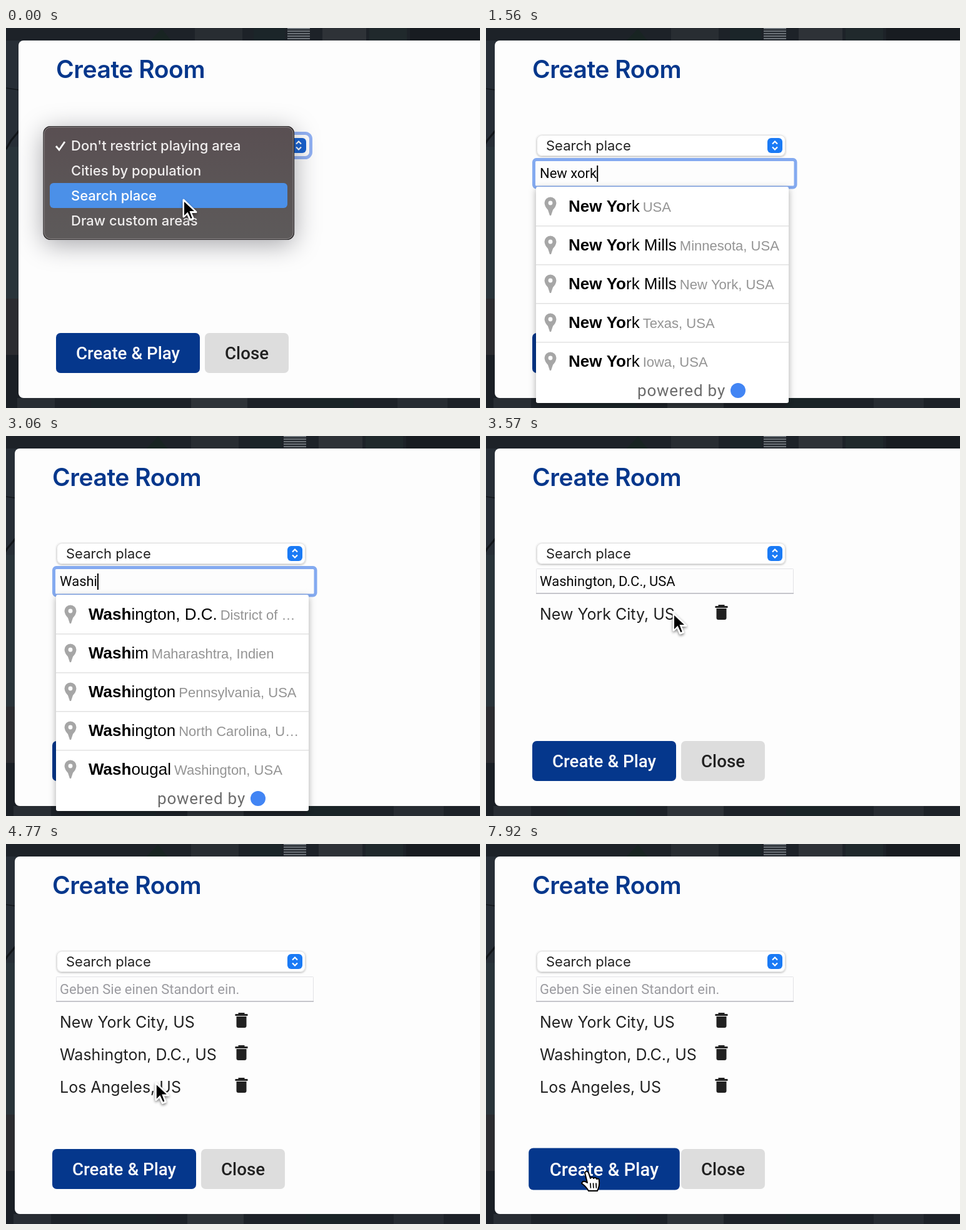
Animation of 758 by 608 pixels, one loop 7.95 s. Source, as an HTML page with a canvas:

```html
<!DOCTYPE html>
<html lang="en">
<head>
<meta charset="utf-8">
<title>Create Room</title>
<style>
  html, body { margin: 0; width: 100%; height: 100%; overflow: hidden; background: #1d2228; }
  canvas { display: block; width: 758px; height: 608px; }
</style>
</head>
<body>
<canvas id="stage" width="758" height="608"></canvas>
<script>
const ctx = document.getElementById('stage').getContext('2d');
const LOOP = 7950;
const MENU_CLOSE = 210;
const KEY_STEP = 105;
const SUGGEST_LAG = 150;
const UI = 'Inter, sans-serif';
const BODY = 'Roboto, sans-serif';
const LIST = '"Liberation Sans", Arial, sans-serif';
const PAPER = '#fdfdfd';
const NAVY = '#05378c';
const INK = '#212121';

const menuItems = ["Don't restrict playing area", 'Cities by population', 'Search place', 'Draw custom areas'];

const searches = [
  {
    focus: 630, start: 800, pick: 2070, clear: 2370, typed: 'New xork', match: 6,
    full: 'New York City, New York, USA', item: 'New York City, US',
    rows: [['New York', 'USA'], ['New York Mills', 'Minnesota, USA'], ['New York Mills', 'New York, USA'],
           ['New York', 'Texas, USA'], ['New York', 'Iowa, USA']]
  },
  {
    focus: 2490, start: 2560, pick: 3450, clear: 3660, typed: 'Washi', match: 4,
    full: 'Washington, D.C., USA', item: 'Washington, D.C., US',
    rows: [['Washington, D.C.', 'District of …'], ['Washim', 'Maharashtra, Indien'],
           ['Washington', 'Pennsylvania, USA'], ['Washington', 'North Carolina, U…'],
           ['Washougal', 'Washington, USA']]
  },
  {
    focus: 3840, start: 4000, pick: 4500, clear: 4710, typed: 'Lo', match: 1,
    full: 'Los Angeles, Kalifornien, USA', item: 'Los Angeles, US',
    rows: [['Las Vegas', 'Nevada, USA'], ['Los Angeles', 'Kalifornien, USA'],
           ['London', 'Vereinigtes Königreich'], ['Lyon', 'Frankreich'],
           ['Lytton', 'Britisch-Kolumbien, Kan…']]
  }
];

// Pointer stops: time, x, y
const path = [
  [0, 284, 275], [240, 284, 275], [570, 292, 230], [1700, 292, 230], [2010, 352, 281],
  [2340, 352, 281], [2470, 320, 230], [3150, 320, 230], [3420, 300, 284], [3640, 300, 284],
  [3820, 270, 230], [4240, 270, 230], [4470, 260, 346], [4710, 260, 346], [4920, 161, 525],
  [LOOP, 161, 525]
];

const clamp = v => Math.max(0, Math.min(1, v));
const smooth = v => v * v * (3 - 2 * v);

function rect(x, y, w, h, color) {
  ctx.fillStyle = color;
  ctx.fillRect(x, y, w, h);
}

function box(x, y, w, h, r, fill, stroke, width = 1) {
  ctx.beginPath();
  ctx.roundRect(x, y, w, h, r);
  if (fill) { ctx.fillStyle = fill; ctx.fill(); }
  if (stroke) { ctx.strokeStyle = stroke; ctx.lineWidth = width; ctx.stroke(); }
}

function poly(points, fill, stroke, width = 1) {
  ctx.beginPath();
  for (const [x, y] of points) ctx.lineTo(x, y);
  if (fill) { ctx.closePath(); ctx.fillStyle = fill; ctx.fill(); }
  if (stroke) { ctx.strokeStyle = stroke; ctx.lineWidth = width; ctx.stroke(); }
}

function disc(x, y, r, color) {
  ctx.beginPath();
  ctx.arc(x, y, r, 0, Math.PI * 2);
  ctx.fillStyle = color;
  ctx.fill();
}

// Draws text and returns its width
function text(str, x, y, font, color, spacing = 0) {
  ctx.font = font;
  ctx.letterSpacing = spacing + 'px';
  ctx.fillStyle = color;
  ctx.fillText(str, x, y);
  return ctx.measureText(str).width;
}

function shadow(color, blur, dy) {
  ctx.shadowColor = color;
  ctx.shadowBlur = blur;
  ctx.shadowOffsetY = dy;
}

function drawBackdrop() {
  rect(-10, 0, 780, 608, '#1d2228');
  rect(-10, 20, 40, 170, '#272e36');
  rect(-10, 190, 40, 243, '#29343a');
  rect(-10, 433, 40, 90, '#2b2c30');
  poly([[-6, 96], [14, 99]], null, '#14181c', 1.5);
  poly([[-6, 194], [2, 180], [16, 163]], null, '#111519', 3);
  poly([[225, 20], [243, 1], [258, 20]], '#182422');
  rect(296, 0, 76, 20, '#282d32');
  rect(390, 0, 50, 20, '#1b2529');
  rect(444, 0, 36, 20, '#6c7278');
  for (let i = 0; i < 5; i++) rect(444, 2 + i * 4, 36, 2, '#23282e');
  rect(500, 0, 70, 20, '#2e3237');
  rect(575, 0, 60, 20, '#20292c');
  rect(640, 0, 130, 20, '#181c21');
  rect(-10, 523, 40, 85, '#1a1f25');
  rect(12, 592, 60, 16, '#282d33');
  rect(130, 592, 110, 16, '#1b2428');
  rect(290, 592, 90, 16, '#2e3338');
  rect(480, 592, 70, 16, '#1a2427');
  rect(620, 592, 80, 16, '#272c32');
}

function drawStepper(x, y, color) {
  box(x, y, 24, 24, 6, color);
  const c = x + 12;
  poly([[c - 4, y + 9.5], [c, y + 5.5], [c + 4, y + 9.5]], null, '#fff', 2.2);
  poly([[c - 4, y + 14.5], [c, y + 18.5], [c + 4, y + 14.5]], null, '#fff', 2.2);
}

function drawSelect() {
  ctx.save();
  shadow('rgba(0,0,0,.28)', 3, 1);
  box(81, 171, 398, 34, 8, '#fff');
  ctx.restore();
  box(81.5, 171.5, 397, 33, 8, null, '#dedede');
  text('Search place', 96, 196, '22px ' + UI, INK);
  drawStepper(450, 176, '#1a7af5');
}

function drawMenu() {
  box(83.5, 168.5, 404, 39, 9, PAPER, '#90b0f3', 5);
  drawStepper(456, 176, '#1560cf');
  const fill = ctx.createLinearGradient(0, 157, 0, 338);
  fill.addColorStop(0, '#594f52');
  fill.addColorStop(1, '#5d5a5a');
  ctx.save();
  shadow('rgba(40,40,50,.42)', 42, 8);
  box(60, 157, 401, 181, 11, fill);
  ctx.restore();
  box(60, 157.5, 400.5, 181, 11, fill, '#2a2728', 1.2);
  box(61.2, 158.7, 398, 178.6, 10, null, '#8b8687');
  box(70, 248, 380, 40, 6, '#4b90e8');
  menuItems.forEach((label, i) =>
    text(label, 104, 196 + i * 40, '500 22px ' + UI, i === 2 ? '#fff' : '#f0eeee'));
  poly([[80, 189], [85, 195], [94, 182]], null, '#fff', 2.8);
}

function drawInput(value, focused) {
  if (focused) box(76.5, 210.5, 418.5, 44.5, 4, PAPER, '#84aaf0', 5);
  else {
    box(80.5, 212.5, 411, 39, 1, PAPER, '#e2e2e6');
    rect(80, 251, 412, 1.5, '#b4b4bc');
  }
  const width = text(value || 'Geben Sie einen Standort ein.', 86, 240, '22px ' + BODY,
    value ? '#0a0a0a' : '#9b9ba0');
  if (focused) rect(86 + (value ? width : 0), 220, 2, 26, '#000');
}

function drawTrash(x, y) {
  rect(x - 10, y + 2, 20, 3, INK);
  rect(x - 5, y, 10, 3, INK);
  box(x - 8, y + 6, 16, 18, [0, 0, 3, 3], INK);
}

function drawItems(items) {
  items.forEach((label, i) => {
    const y = i * 52;
    text(label, 86, 294 + y, '25px ' + UI, INK);
    drawTrash(376.5, 270 + y);
  });
}

function drawButton(label, x, w, fill, color, scale = 1) {
  ctx.save();
  ctx.translate(x + w / 2, 520);
  ctx.scale(scale, scale);
  box(-w / 2, -32, w, 64, 7, fill);
  text(label, 32 - w / 2, 10, '500 27.7px ' + BODY, color);
  ctx.restore();
}

function drawPin(x, y) {
  ctx.beginPath();
  ctx.arc(x, y, 9.5, Math.PI, 0);
  ctx.quadraticCurveTo(x + 9, y + 6, x + 4, y + 11);
  ctx.lineTo(x + 1, y + 20);
  ctx.lineTo(x - 1, y + 20);
  ctx.lineTo(x - 4, y + 11);
  ctx.quadraticCurveTo(x - 9, y + 6, x - 9.5, y);
  ctx.fillStyle = '#a6a6a6';
  ctx.fill();
  disc(x, y, 3.4, PAPER);
}

function drawSuggestions(rows, bold) {
  ctx.save();
  shadow('rgba(0,0,0,.32)', 11, 3);
  box(80, 254, 404, 346, 3, '#fff');
  ctx.restore();
  rows.forEach(([place, region], i) => {
    const y = 294 + i * 62;
    let x = 132;
    drawPin(103, y - 14);
    x += text(place.slice(0, bold), x, y, 'bold 26px ' + LIST, '#000');
    x += text(place.slice(bold), x, y, '26px ' + LIST, '#000');
    text(region, x + 5, y, '22px ' + LIST, '#949494');
    if (i < 4) rect(80, y + 22, 404, 1.5, '#e2e2e2');
  });
  text('powered by', 242, 589, '26px ' + BODY, '#6b6b6b', 0.8);
  disc(403, 580, 12, '#4285f4');
}

function drawArrow(x, y) {
  ctx.save();
  ctx.translate(x, y);
  ctx.lineJoin = 'round';
  shadow('rgba(0,0,0,.4)', 4, 2);
  const shape = [[0, 0], [0, 27], [6, 21.5], [10.5, 32], [15.5, 30], [11, 19.5], [20, 19.5], [0, 0]];
  poly(shape, '#fff', '#fff', 3);
  ctx.shadowColor = 'transparent';
  poly([[1, 3], [1, 25], [6.5, 19.5], [11.5, 30], [13.5, 29], [9.5, 18], [17, 18]], '#000');
  ctx.restore();
}

function drawHand(x, y) {
  ctx.save();
  ctx.translate(x, y);
  ctx.lineJoin = ctx.lineCap = 'round';
  ctx.beginPath();
  ctx.moveTo(-3, 1);
  ctx.quadraticCurveTo(0, -4, 3, 1);
  ctx.lineTo(6, 10);
  ctx.quadraticCurveTo(9, 6, 11, 10);
  ctx.quadraticCurveTo(14, 7, 16, 11);
  ctx.quadraticCurveTo(20, 9, 20, 14);
  ctx.quadraticCurveTo(21, 22, 17, 30);
  ctx.lineTo(3, 30);
  ctx.quadraticCurveTo(-1, 23, -8, 18);
  ctx.quadraticCurveTo(-6, 12, 1, 17);
  ctx.closePath();
  ctx.fillStyle = '#fff';
  ctx.fill();
  ctx.strokeStyle = '#000';
  ctx.lineWidth = 2;
  ctx.stroke();
  for (const dx of [6, 10.5, 15]) poly([[dx, 18], [dx + 0.4, 25]], null, '#000', 1.7);
  ctx.restore();
}

function pointerAt(t) {
  const i = Math.max(1, path.findIndex(p => p[0] > t));
  const [t0, x0, y0] = path[i - 1];
  const [t1, x1, y1] = path[i];
  const k = smooth(clamp((t - t0) / (t1 - t0)));
  return [x0 + (x1 - x0) * k, y0 + (y1 - y0) * k];
}

const typedCount = (s, t) =>
  Math.max(0, Math.min(s.typed.length, Math.floor((t - s.start) / KEY_STEP) + 1));

function draw(t) {
  const menuOpen = t < MENU_CLOSE;
  const active = searches.find(s => t >= s.focus && t < s.clear);
  const focused = !!active && t < active.pick;
  const hover = smooth(clamp((t - 4860) / 120));

  ctx.save();
  if (menuOpen) ctx.translate(6, 0);
  drawBackdrop();
  box(14, 20, 800, 572, 8, PAPER);
  text('Create Room', 74, 80, '600 39px ' + UI, NAVY, -0.45);
  drawButton('Close', 312, 134, '#dddddd', INK);
  drawButton('Create & Play', 74, 230, NAVY, '#fcfcfc', 1 + 0.05 * hover);
  ctx.restore();

  if (menuOpen) drawMenu();
  else {
    const value = !active ? '' : focused ? active.typed.slice(0, typedCount(active, t)) : active.full;
    drawSelect();
    drawInput(value, focused);
    drawItems(searches.filter(s => t >= s.clear).map(s => s.item));
    if (focused) {
      const bold = Math.min(active.match, typedCount(active, t - SUGGEST_LAG));
      if (bold > 0) drawSuggestions(active.rows, bold);
    }
  }

  // The pointer hides while keys are pressed
  const typing = searches.some((s, i) => t >= s.start && t < [1710, 3160, 4250][i]);
  if (!typing) {
    const [x, y] = pointerAt(t);
    (t >= 4890 ? drawHand : drawArrow)(x, y);
  }
}

function tick() {
  draw(performance.now() % LOOP);
  requestAnimationFrame(tick);
}
tick();
</script>
</body>
</html>
```
